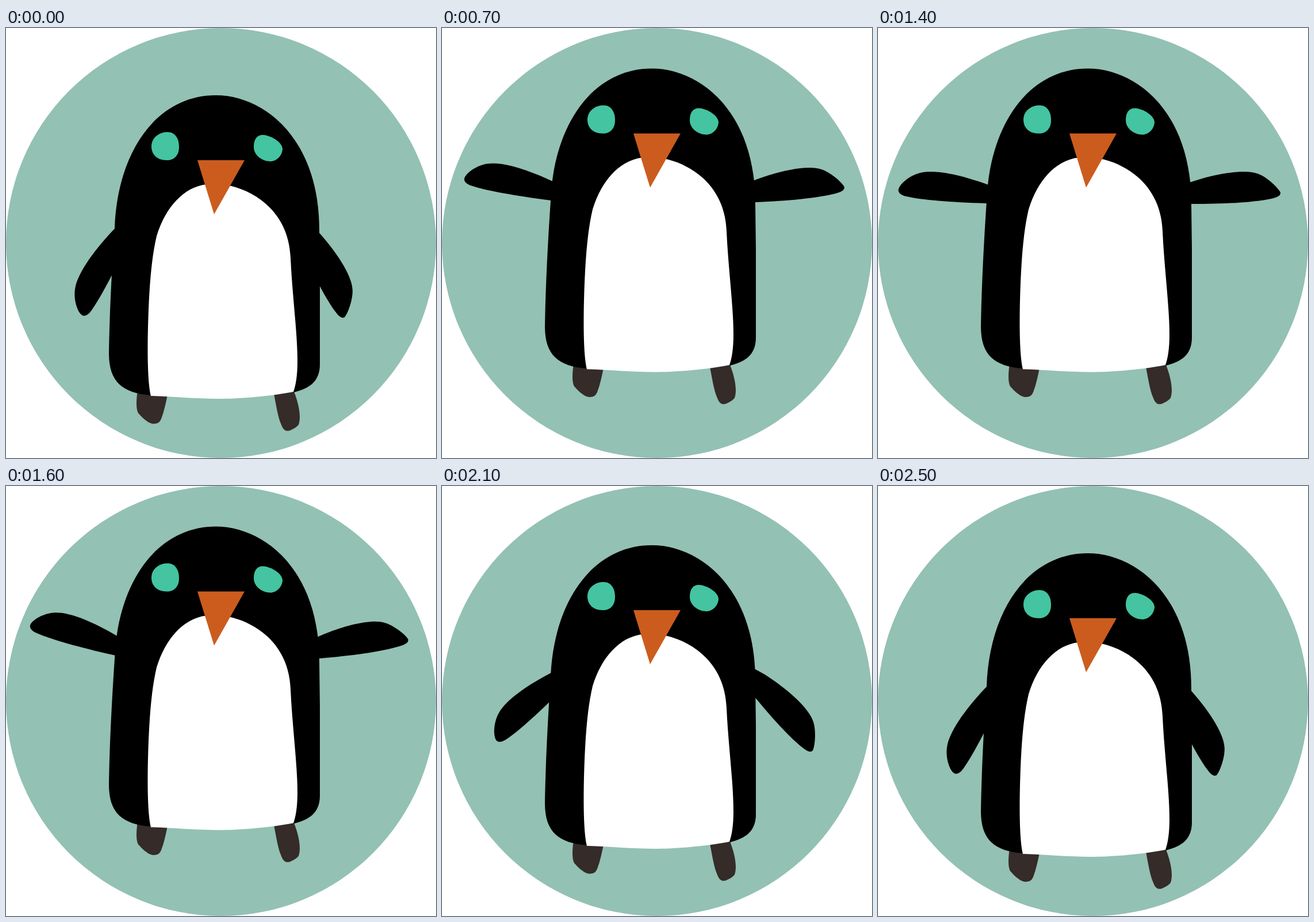
Recreate the animation shown at these times as an HTML page. Size 748 px wide and 748 px high, loop 3.1 s.

```html
<!DOCTYPE html>
<html lang="en">
<head>
<meta charset="utf-8">
<title>Flapping penguin</title>
<style>
  html, body { margin: 0; width: 100%; height: 100%; overflow: hidden; background: #fff; }
  svg { display: block; width: 100%; height: 100%; }
</style>
</head>
<body>
<svg viewBox="0 0 748 748">
  <circle cx="374" cy="374" r="374" fill="#93c1b3"/>
  <g id="penguin">
    <g fill="#352b29">
      <path d="M229 630C226 650 226 667 232 672C240 681 250 689 257 688.500C263 688 267 687 270 680C275 667 278 652 281 638L270 625Z"/>
      <path d="M466 636C470 657 473 676 478 688C482 699 486 702 493 700.500C501 697 506 694 509 690C514 676 509 652 500 630Z"/>
    </g>
    <!-- Each flipper has its tip at the origin -->
    <path id="left" d="M0 0C1-10 20-26 38-30C62-36 105-28 157-9L195 8V24L152 23C90 21 40 17 14 11C5 9 0 5 0 0Z"/>
    <path id="right" d="M0 0C-3-7-22-26-38-32C-62-42-115-32-156-18L-200 0V20H-154C-100 20-50 18-16 11C-6 9 1 6 0 0Z"/>
    <path d="M189 347C194 215 262 117 365 117C449 117 545 192 545 352L546 430V585C546 615 528 627 500 634L252 639C203 635 179 616 179 566C180 500 184 420 189 347Z"/>
    <path fill="#fff" d="M252 640C246 615 246 560 247 520C249 450 253 400 262 362C278 310 310 277 348 272L388 274C430 283 492 318 495 400C498 465 507 530 507 580C507 605 504 622 500 633C450 642 400 645 370 645C330 645 290 641 252 640Z"/>
    <path fill="#cc5c1e" d="M333 230H415L362 324Z"/>
    <g fill="#44c4a1">
      <path d="M253 206C253 191 266 181 281 181C294 181 301 192 301 207C301 222 292 230 280 230C264 230 253 221 253 206Z"/>
      <path d="M431 207C431 194 436 186 447 186C462 187 481 199 481 211C480 223 470 232 460 232C445 232 431 221 431 207Z"/>
    </g>
  </g>
</svg>
<script>
const LOOP = 3100, STEP = 100;

// Flipper poses: left tip x, y, angle, then right tip x, y, angle
const down = [133, 500, -67, 589, 503, 66];
const loose = [124, 490, -61, 606, 492, 62];
const low = [95, 457, -47, 645, 474, 51];
const half = [70, 413.5, -30, 686, 392.5, 18];
const wide = [47, 376.5, -15.5, 698, 355.5, 8];
const flat = [35.5, 328.5, 0, 700, 332.5, 0];
const raised = [42, 289, 11, 699.5, 313, -5];
const high = [56.5, 252.5, 22, 698, 294, -10.5];

// Time, sway, lift, flippers
const keys = [
  [0, 0, 0, ...down],
  [100, 0, 0, ...down],
  [200, 0, 0, ...loose],
  [300, 0, 14, ...low],
  [400, 0, 32.6, ...half],
  [500, 0, 46.5, ...wide],
  [600, 0, 46.5, ...flat],
  [800, 0, 46.5, ...raised],
  [1000, -3.5, 46.5, ...high],
  [1200, 0, 46.5, ...raised],
  [1400, 0, 46.5, ...flat],
  [1600, 0, 46.5, ...raised],
  [1800, 0, 46.5, ...flat],
  [1900, 0, 46.5, ...wide],
  [2000, 0, 32.6, ...half],
  [2100, 0, 14, ...low],
  [2200, 0, 0, ...loose],
  [2500, 0, 0, ...down],
  [LOOP, 0, 0, ...down]
];

const [penguin, left, right] = ["penguin", "left", "right"].map(id => document.getElementById(id));

function poseAt(t) {
  const i = keys.findIndex(k => k[0] > t);
  const a = keys[i - 1], b = keys[i];
  const u = (t - a[0]) / (b[0] - a[0]);
  return a.map((v, j) => v + (b[j] - v) * u).slice(1);
}

function place(el, x, y, angle = 0) {
  el.setAttribute("transform", `translate(${x} ${y}) rotate(${angle})`);
}

function draw() {
  const t = Math.floor(performance.now() % LOOP / STEP) * STEP;
  const [sway, lift, lx, ly, la, rx, ry, ra] = poseAt(t);
  place(penguin, sway, -lift);
  place(left, lx, ly, la);
  place(right, rx, ry, ra);
  requestAnimationFrame(draw);
}
draw();
</script>
</body>
</html>
```
